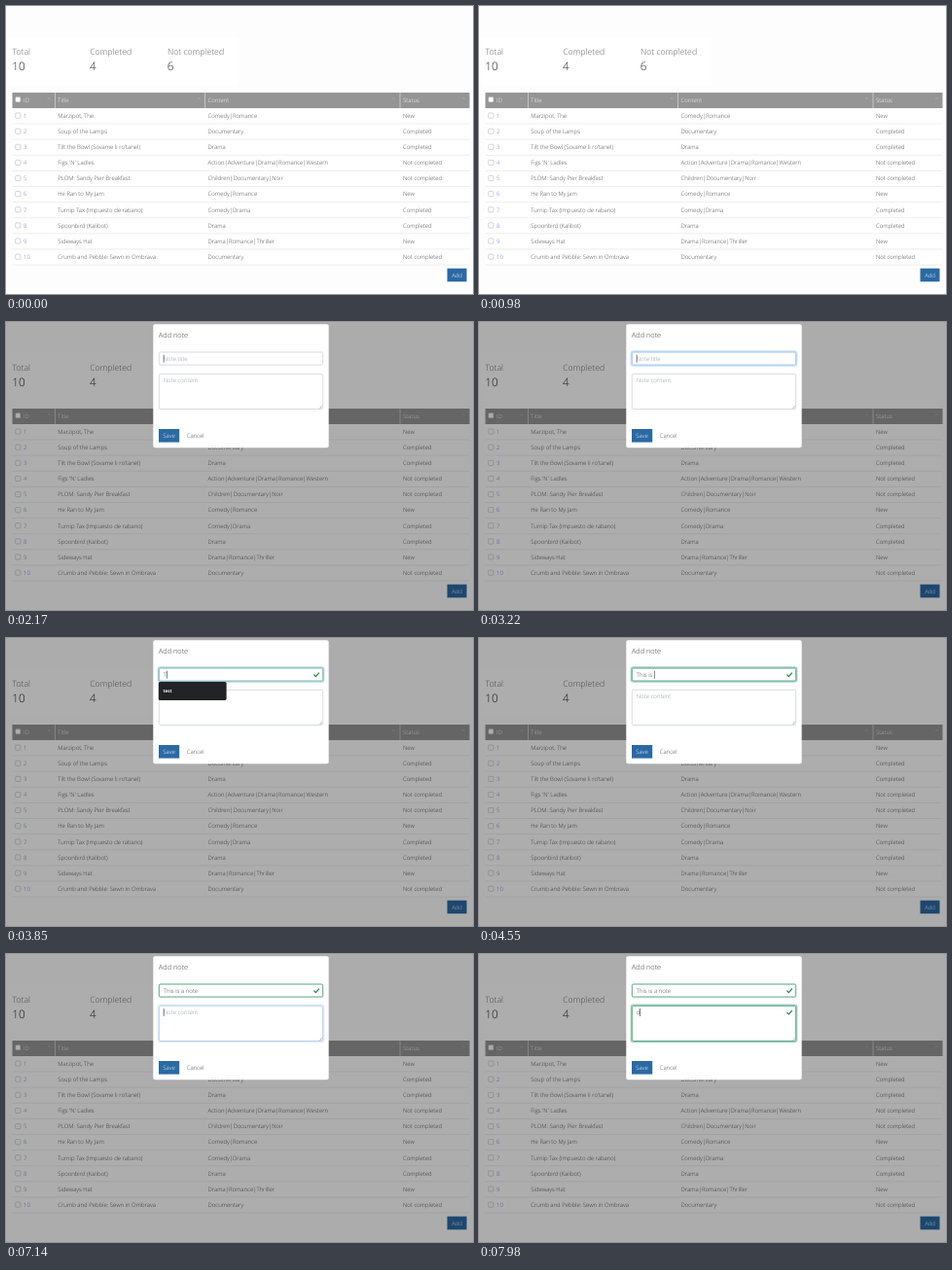
An HTML page that plays this animation: 480x296 px, repeating every 8000 ms.

```html
<!DOCTYPE html>
<html lang="en">
<head>
<meta charset="utf-8">
<title>Notes</title>
<style>
html, body { margin: 0; width: 100%; height: 100%; overflow: hidden; background: #f2f2f2; }
svg { display: block; width: 480px; height: 296px; }
text {
  font: 300 6px "Open Sans", sans-serif;
  fill: #444;
  white-space: pre;
  text-rendering: geometricPrecision;
}
.label { font-size: 8.7px; fill: #666; }
.count { font-size: 11.7px; fill: #222; }
.heading { font-size: 7.4px; }
.id { fill: #5b78e0; }
.light { fill: #fff; }
.hint { fill: #8a9096; }
.option { font-size: 4.6px; font-weight: 700; fill: #fff; }
.line { fill: none; stroke: #e2e2e2; stroke-width: .6; }
.sort { fill: none; stroke: #c4c4c4; stroke-width: .5; }
.box { fill: #fff; stroke: #a8a8a8; stroke-width: .5; }
.tick { fill: none; stroke: #2b8746; stroke-width: 1.3; }
.glow { fill: none; stroke-width: 1.4; }
.field { fill: #fff; stroke-width: .8; }
.button { fill: #2a69a4; }
</style>
</head>
<body>
<svg id="stage" viewBox="0 0 480 296"></svg>
<script>
const LOOP = 8000;
const GREY = [206, 212, 218], BLUE = [128, 180, 240], GREEN = [42, 145, 100];

const rows = [
  ["Marzipot, The", "Comedy|Romance", "New"],
  ["Soup of the Lamps", "Documentary", "Completed"],
  ["Tilt the Bowl (Sovame li ro'tanel)", "Drama", "Completed"],
  ["Figs 'N' Ladles", "Action|Adventure|Drama|Romance|Western", "Not completed"],
  ["PLOM: Sandy Pier Breakfast", "Children|Documentary|Noir", "Not completed"],
  ["He Ran to My Jam", "Comedy|Romance", "New"],
  ["Turnip Tax (Impuesto de rabano)", "Comedy|Drama", "Completed"],
  ["Spoonbird (Kalibot)", "Drama", "Completed"],
  ["Sideways Hat", "Drama|Romance|Thriller", "New"],
  ["Crumb and Pebble: Sewn in Ombrava", "Documentary", "Not completed"]
];

// [time, text] keystrokes for each field
const titleKeys = [
  [3780, "T"], [3920, "Th"], [4060, "Thi"], [4200, "This "], [4340, "This i"],
  [4550, "This is "], [4760, "This is n"], [6160, "This is "], [6300, "This is a"],
  [6370, "This is a "], [6510, "This is a n"], [6580, "This is a no"],
  [6720, "This is a not"], [6790, "This is a note"]
];
const contentKeys = [[7840, "d"]];
const caretGaps = [[2730, 3220], [5320, 5810], [7630, 7840]];

const text = (x, y, s, cls = "", extra = "") => `<text x="${x}" y="${y}" class="${cls}" ${extra}>${s}</text>`;
const rect = (x, y, w, h, attrs = "") => `<rect x="${x}" y="${y}" width="${w}" height="${h}" ${attrs}/>`;
const path = (d, cls, extra = "") => `<path d="${d}" class="${cls}" ${extra}/>`;
const checkbox = y => rect(9.7, y - 2.7, 5.2, 5.2, 'rx="1" class="box"');
const button = (x, y, w, s) => rect(x, y, w, 13.6, 'class="button"') +
  text(x + w / 2, y + 9, s, "light", 'text-anchor="middle"');

function page() {
  const stats = [["Total", 10], ["Completed", 4], ["Not completed", 6]].map(([name, n], i) =>
    text(6.5 + 79.7 * i, 50, name, "label") + text(6.3 + 79.7 * i, 66, n, "count")).join("");
  const header = rect(6.5, 89, 470, 16, 'fill="#959595"') +
    [50.5, 204.5, 405].map(x => rect(x - .3, 89, .6, 16, 'fill="#e4e4e4"')).join("") +
    [44, 198.3, 398.3, 470.3].map(x => path(`M${x - 1.3} 95.6l1.3-1.2 1.3 1.2`, "sort")).join("") +
    checkbox(96.3) + text(18, 98.6, "ID", "light") +
    [[53.3, "Title"], [207.6, "Content"], [408, "Status"]].map(([x, s]) => text(x, 99.3, s, "light")).join("");
  const body = rows.map(([title, content, status], i) => {
    const y = 112.7 + 16.12 * i;
    return checkbox(y) + text(18, y + 2.1, i + 1, "id") + text(53.3, y + 2.1, title) +
      text(207.6, y + 2.1, content) + text(408, y + 2.1, status) +
      path(`M6.5 ${y + 8.3}H476.5`, "line");
  }).join("");
  return rect(0, 0, 480, 296, 'rx="3" fill="#fdfdfd"') + rect(2, 32, 237, 49, 'fill="#fff"') +
    rect(6.5, 105, 470, 161, 'fill="#fff"') + stats + header + body + button(453.5, 269.7, 20, "Add");
}

function field(id, y, h, hint) {
  return `<g id="${id}">` + rect(156.3, y - .7, 170.4, h + 1.4, 'rx="2" class="glow"') +
    rect(157.3, y + .3, 168.4, h - .6, 'rx="1.4" class="field"') +
    text(161.8, y + 9, hint, "hint") + text(161.8, y + 9, "", "value") +
    rect(0, y + 3, .6, 8, 'fill="#222" class="caret"') +
    path(`M316.4 ${y + 6.9}l2 2 3.5-4`, "tick") + "</g>";
}

function dialog() {
  return rect(0, 0, 480, 296, 'fill-opacity=".32"') +
    rect(151.3, 2.2, 180.4, 127, 'rx="2" fill="#fff"') + text(156.8, 16, "Add note", "heading") +
    field("title", 30.7, 13.7, "Note title") + field("content", 53, 36.8, "Note content") +
    path("M322.3 88.6l2.4-2.4M323.7 88.6l1-1", "sort", 'style="stroke:#777"') +
    button(157, 110, 21.2, "Save") + text(185.7, 119, "Cancel") +
    '<g id="suggestion">' + rect(156.8, 45, 69.8, 19, 'rx="1.6" fill="#222326"') +
    text(161.6, 56.2, "test", "option") + "</g>";
}

const stage = document.getElementById("stage");
stage.innerHTML = page() + `<g id="dialog">${dialog()}</g>`;

const get = id => document.getElementById(id);
const show = (el, on) => el.setAttribute("display", on ? "inline" : "none");
const ramp = (t, start, end) => Math.min(1, Math.max(0, (t - start) / (end - start)));
const mix = (a, b, k) => a.map((v, i) => v + (b[i] - v) * k);
const rgb = c => `rgb(${c.map(Math.round)})`;

function drawField(id, t, keys, focus, active) {
  const part = name => get(id).querySelector("." + name);
  const valid = ramp(t, keys[0][0], keys[0][0] + 140);
  const key = keys.filter(([time]) => t >= time).pop();
  const value = part("value"), caret = part("caret");
  value.textContent = key ? key[1] : "";
  show(part("hint"), !key);
  show(part("tick"), key);
  part("field").style.stroke = rgb(mix(mix(GREY, BLUE, focus), GREEN, valid));
  part("glow").style.stroke = rgb(mix(BLUE, GREEN, valid));
  part("glow").style.strokeOpacity = focus * .4;
  caret.setAttribute("x", 161.8 + (key ? value.getComputedTextLength() : 0));
  show(caret, active && !caretGaps.some(([from, to]) => t >= from && t < to));
}

function draw(t) {
  show(get("dialog"), t >= 2170);
  if (t < 2170) return;
  drawField("title", t, titleKeys, ramp(t, 2170, 2310) - ramp(t, 7070, 7140), t < 7070);
  drawField("content", t, contentKeys, ramp(t, 7070, 7210), t >= 7070);
  show(get("suggestion"), t >= 3800 && t < 3920);
}

const start = performance.now();
function tick() {
  draw((performance.now() - start) % LOOP);
  requestAnimationFrame(tick);
}
tick();
</script>
</body>
</html>
```
